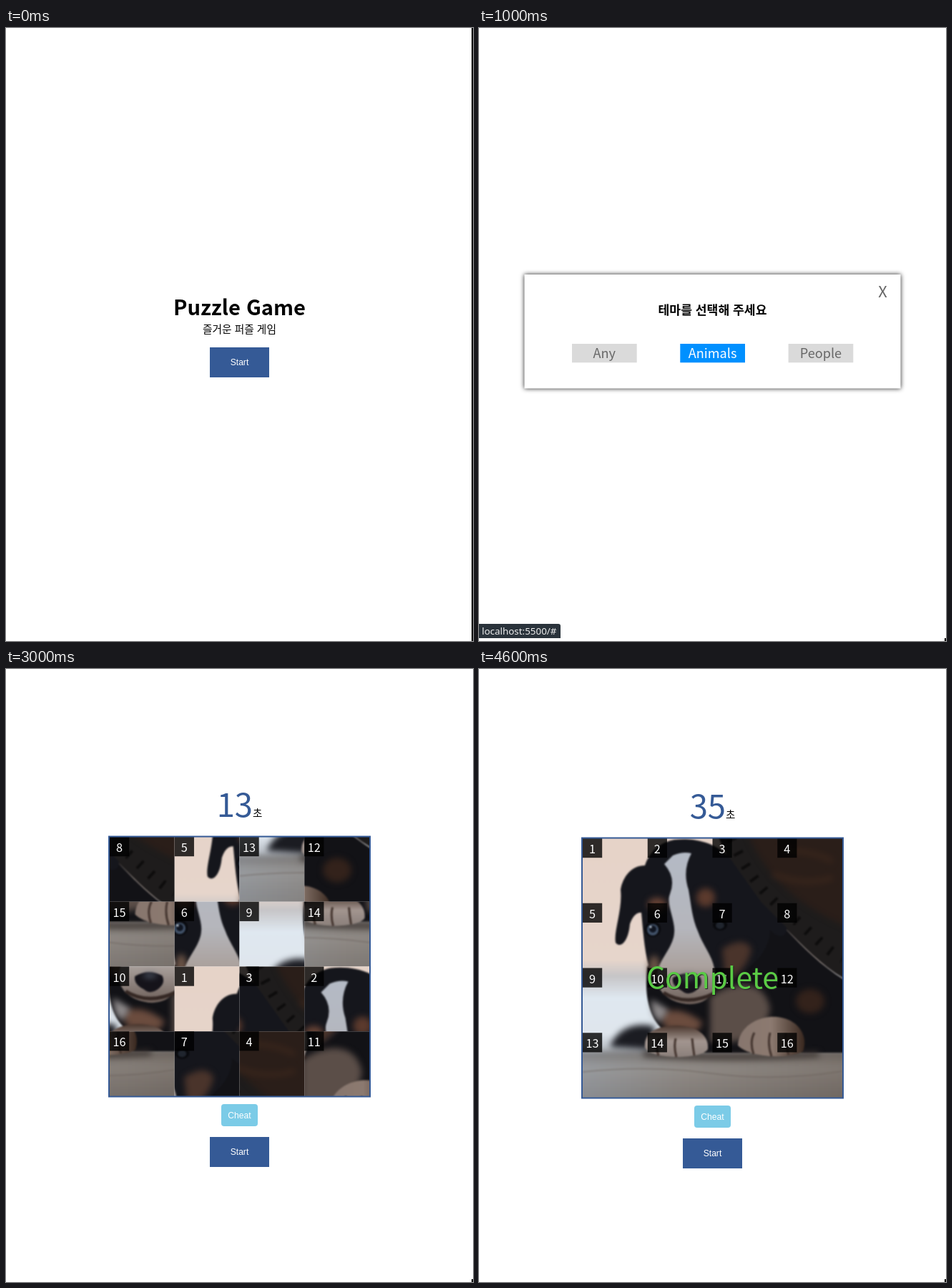
An HTML page for the animation above (5000 ms loop, 653 by 858 pixels).

```html
<!DOCTYPE html>
<html lang="ko">
<head>
<meta charset="utf-8">
<title>Puzzle Game</title>
<style>
html, body { margin: 0; width: 100%; height: 100%; overflow: hidden; background: #fff; }
#stage { display: block; width: 653px; height: 858px; }
text { font-family: "Noto Sans CJK KR", "Noto Sans CJK JP", sans-serif; font-size: 14.5px; text-anchor: middle; }
.ui { font: 12.1px "Liberation Sans", Arial, sans-serif; fill: #fff; }
.choice { font-size: 18.15px; fill: #666; }
.label { font-size: 16.3px; fill: #fff; }
.soft { filter: blur(4px); }
.photo { filter: blur(.8px); }
</style>
</head>
<body>
<svg id="stage" viewBox="0 0 653 858">
  <defs>
    <linearGradient id="wall" x2="0" y2="1">
      <stop offset="0" stop-color="#e6d3c8"/><stop offset=".47" stop-color="#e6d5cb"/>
      <stop offset=".53" stop-color="#c6c5c7"/><stop offset=".61" stop-color="#dfe8f0"/>
      <stop offset=".74" stop-color="#dfe6ed"/><stop offset=".83" stop-color="#a4a9b0"/>
    </linearGradient>
    <linearGradient id="floor">
      <stop offset="0" stop-color="#92979d"/><stop offset=".4" stop-color="#87827e"/><stop offset="1" stop-color="#736b65"/>
    </linearGradient>
    <linearGradient id="shade" x2="0" y2="1">
      <stop offset="0" stop-color="#2a221e" stop-opacity=".3"/><stop offset=".3" stop-color="#c8c0b8" stop-opacity=".15"/>
      <stop offset="1" stop-color="#2a221e" stop-opacity=".1"/>
    </linearGradient>
    <linearGradient id="blaze" x2="0" y2="1">
      <stop offset="0" stop-color="#b4bac5"/><stop offset=".5" stop-color="#b5b6bc"/>
      <stop offset=".75" stop-color="#aba29e"/><stop offset="1" stop-color="#6d5f59"/>
    </linearGradient>
    <linearGradient id="pawLeft" x2="0" y2="1">
      <stop offset="0" stop-color="#49352c"/><stop offset=".5" stop-color="#a2958f"/><stop offset="1" stop-color="#8b807b"/>
    </linearGradient>
    <linearGradient id="pawRight">
      <stop offset="0" stop-color="#87766e"/><stop offset=".5" stop-color="#8c7a70"/><stop offset="1" stop-color="#39281f"/>
    </linearGradient>
    <g id="photo" class="photo">
      <rect x="-9" y="-9" width="381" height="381" fill="url(#wall)"/>
      <path class="soft" d="M-9 299L372 297V380H-9Z" fill="url(#floor)"/>
      <path class="soft" d="M-9 299L372 297V380H-9Z" fill="url(#shade)"/>
      <path d="M0 327Q90 317 180 329T363 326" fill="none" stroke="#665e58" stroke-width="2" opacity=".4"/>
      <!-- tyre -->
      <path d="M187-9C212 55 245 95 282 125C310 152 335 180 372 200V-9Z" fill="#1e1c1c"/>
      <path class="soft" d="M230-9C252 48 300 95 372 125V-9Z" fill="#2a1e19"/>
      <path class="soft" d="M275 18Q315 15 350 32M265 50Q310 68 350 55" fill="none" stroke="#40291d" stroke-width="8" opacity=".6"/>
      <path d="M208 0C230 52 262 88 300 116C325 138 345 160 363 168" fill="none" stroke="#0d0c0c" stroke-width="14" stroke-dasharray="4 17"/>
      <!-- body -->
      <path d="M90 180C86 220 92 255 118 272L150 300H372V202C335 180 310 154 284 127L200 60Z" fill="#121216"/>
      <path class="soft" d="M38 292C50 263 75 258 100 263V296Z" fill="#1b1c22"/>
      <path class="soft" d="M178 222C215 195 255 200 262 238C258 268 235 290 178 285Z" fill="#5b4e48"/>
      <ellipse class="soft" cx="318" cy="228" rx="20" ry="17" fill="#33221b"/>
      <path class="soft" d="M108 245Q135 232 168 258L160 270L115 266Z" fill="#6b4c3e"/>
      <path class="soft" d="M95 225L120 240L108 258L98 246Z" fill="#8e8a8b"/>
      <!-- head -->
      <path d="M128 2C105 6 92 22 87 38C68 38 56 54 53 72C56 100 43 130 46 146C53 155 64 144 66 120C70 108 76 103 82 104C84 125 86 155 92 178C110 212 190 222 220 190C248 172 262 150 262 128C274 142 286 138 285 125L250 90L206 28C185 3 150-1 128 2Z" fill="#15161c"/>
      <g class="soft">
        <ellipse cx="104" cy="92" rx="13" ry="9" fill="#684335"/>
        <ellipse cx="172" cy="83" rx="13" ry="13" fill="#5b3a2d"/>
        <path d="M195 155Q225 135 236 155Q230 185 200 200Z" fill="#4a342b"/>
        <ellipse cx="100" cy="182" rx="8" ry="18" fill="#6d5547"/>
      </g>
      <path d="M126 24Q140 18 152 21Q139 45 148 72C152 95 153 112 161 130C168 150 181 164 184 182C191 215 175 234 145 232C116 228 100 210 104 188C107 170 127 152 128 132C130 115 116 92 122 78Q131 55 114 36Z" fill="url(#blaze)"/>
      <path d="M113 216Q145 236 184 217" fill="none" stroke="#352824" stroke-width="5"/>
      <path d="M126 195Q145 184 164 194Q170 205 157 214Q147 221 138 213Q124 206 126 195Z" fill="#15131a"/>
      <ellipse class="soft" cx="147" cy="194" rx="10" ry="3" fill="#566070"/>
      <circle cx="98" cy="127" r="11" fill="#090a0e"/>
      <circle cx="98" cy="128" r="8" fill="#42536a"/>
      <circle cx="98" cy="127" r="5" fill="#101520"/>
      <circle cx="95" cy="124" r="1.5" fill="#dbe5ef"/>
      <ellipse cx="192" cy="121" rx="10" ry="8" fill="#08090c"/>
      <ellipse cx="192" cy="122" rx="6" ry="5" fill="#20252e"/>
      <!-- paws -->
      <path class="soft" d="M85 302Q200 310 330 302" fill="none" stroke="#3a3330" stroke-width="7"/>
      <path d="M87 293C85 270 105 263 130 262C160 262 177 276 175 295C168 309 98 311 87 293Z" fill="url(#pawLeft)"/>
      <path d="M217 290C218 264 245 248 272 250C302 253 316 277 308 298C290 309 235 308 217 290Z" fill="url(#pawRight)"/>
      <path d="M107 280Q101 290 106 304M130 280Q127 292 131 306M153 280Q154 292 156 304M240 272Q233 285 239 302M262 272Q258 288 264 305M284 273Q283 288 288 303" fill="none" stroke="#43342e" stroke-width="3"/>
    </g>
  </defs>

  <rect id="edge" x="651" width="2" height="854"/>
  <rect x="651" y="854" width="2" height="4"/>

  <g id="intro">
    <text x="326.5" y="402" style="font-size:29.1px;font-weight:700">Puzzle Game</text>
    <text x="326.5" y="427" style="font-size:14.7px">즐거운 퍼즐 게임</text>
  </g>

  <g id="theme">
    <rect x="63.5" y="345" width="526" height="159.5" fill="#fff" style="filter:drop-shadow(0 0 3.2px rgb(0 0 0/.9))"/>
    <text x="564.5" y="377" style="font-size:21.8px;font-weight:500" fill="#666">X</text>
    <text x="326.5" y="401" style="font-size:17.2px;font-weight:700">테마를 선택해 주세요</text>
    <g id="choices"></g>
    <path d="M0 834H111Q114 834 114 837V854H0Z" fill="#2a333b"/>
    <text x="4" y="849" fill="#eee" style="font:13.4px 'Noto Sans','Open Sans',sans-serif;text-anchor:start">localhost:5500/#</text>
  </g>

  <g id="game">
    <text x="326.5" y="209"><tspan id="seconds" fill="#355a96" style="font-size:45.4px"></tspan>초</text>
    <svg id="board" x="145" y="237" width="363" height="363"></svg>
    <rect x="144" y="236.5" width="365" height="364" fill="none" stroke="#355a96" stroke-width="2"/>
    <text id="complete" x="326.5" y="446.8" fill="#5acb45" style="font-size:40.8px;text-shadow:1px 1px 1px #222">Complete</text>
    <rect x="301" y="611" width="51" height="31" rx="4" fill="#7bcbe7"/>
    <text class="ui" x="326.5" y="631">Cheat</text>
  </g>

  <g id="start">
    <rect x="285" y="447" width="83" height="42" fill="#355a96"/>
    <text class="ui" x="326.5" y="472.3">Start</text>
  </g>
  <rect id="strip" y="851" width="114" height="3" fill="#2a333b"/>
</svg>
<script>
const $ = id => document.getElementById(id);
const show = (id, on) => $(id).style.display = on ? '' : 'none';
const shift = (id, y) => $(id).setAttribute('transform', `translate(0 ${y})`);

const TILE = 90.75;
const shuffled = [8, 5, 13, 12, 15, 6, 9, 14, 10, 1, 3, 2, 16, 7, 4, 11];
const solved = shuffled.map((_, i) => i + 1);

const scenes = [
  { name: 'intro' },
  { name: 'theme' },
  { name: 'game', seconds: 9, order: shuffled, strip: true },
  { name: 'game', seconds: 13, order: shuffled, labels: true, y: -2 },
  { name: 'game', seconds: 35, order: solved, labels: true, done: true }
];

$('choices').innerHTML = ['Any', 'Animals', 'People'].map((name, i) => {
  const x = 130 + i * 151.3, active = i === 1;
  return `<rect x="${x}" y="442" width="90.7" height="26.3" fill="${active ? '#0090ff' : '#dadada'}"/>
    <text class="choice" x="${x + 45.3}" y="462" ${active ? 'style="fill:#fff"' : ''}>${name}</text>`;
}).join('');

const cell = i => [i % 4 * TILE, Math.floor(i / 4) * TILE];

function piece(n, i) {
  const [x, y] = cell(i), [px, py] = cell(n - 1);
  return `<svg x="${x}" y="${y}" width="${TILE}" height="${TILE}" viewBox="${px} ${py} ${TILE} ${TILE}"><use href="#photo"/></svg>`;
}

function label(n, i) {
  const [x, y] = cell(i);
  return `<rect x="${x}" y="${y}" width="27.2" height="27.2" fill="#000" fill-opacity=".8"/>
    <text class="label" x="${x + 13.6}" y="${y + 21}">${n}</text>`;
}

function render({ name, seconds, order, labels, done, strip, y = 0 }) {
  for (const id of ['intro', 'theme', 'game']) show(id, id === name);
  show('edge', name === 'intro');
  show('start', name !== 'theme');
  show('strip', strip);
  shift('start', name === 'game' ? 210 + y : 0);
  if (name !== 'game') return;
  shift('game', y);
  show('complete', done);
  $('seconds').textContent = seconds;
  const picture = done ? '<use href="#photo"/>' : order.map(piece).join('');
  $('board').innerHTML = picture + (labels ? order.map(label).join('') : '');
}

let current = -1;
const begin = performance.now();
function tick() {
  const index = Math.floor((performance.now() - begin) / 1000) % scenes.length;
  if (index !== current) render(scenes[current = index]);
  requestAnimationFrame(tick);
}
tick();
</script>
</body>
</html>
```
